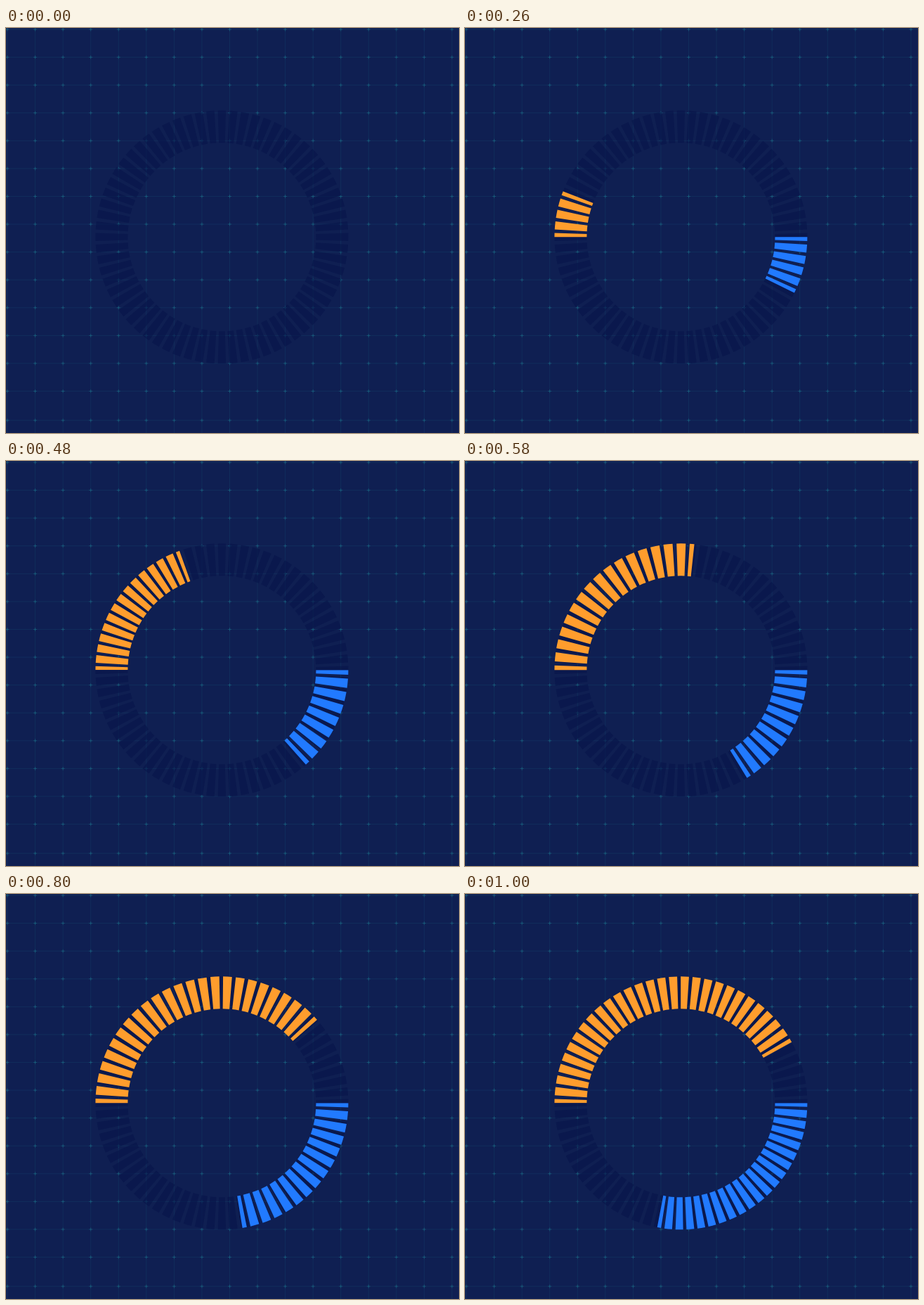
An HTML page without scripts that plays this animation: 645 by 576 pixels, repeating every 1020 ms.

```html
<!DOCTYPE html>
<html lang="en">
<head>
<meta charset="utf-8">
<title>Dashed ring gauge</title>
<style>
  @property --k { syntax: "<number>"; inherits: true; initial-value: 0; }
  @property --u { syntax: "<number>"; inherits: true; initial-value: 0; }
  @property --v { syntax: "<number>"; inherits: true; initial-value: 0; }
  @property --a { syntax: "<number>"; inherits: true; initial-value: 0; }
  @property --parts { syntax: "<number>"; inherits: true; initial-value: 1; }
  /* an integer type rounds its calc() */
  @property --m { syntax: "<integer>"; inherits: true; initial-value: 1; }

  html, body { margin: 0; width: 100%; height: 100%; overflow: hidden; background: #0f1f52; }
  svg { display: block; width: 645px; height: 576px; animation: tick 1020ms steps(51) infinite; }
  @keyframes tick { from { --k: 0; } to { --k: 51; } }

  .line { stroke: rgb(38 150 165 / .12); }
  .cross { stroke: rgb(38 150 165 / .36); }
  .cols { stroke-dasharray: 1 38.56; stroke-dashoffset: -1.5; }
  .bars { stroke-dasharray: 5 34.56; stroke-dashoffset: .5; }

  circle { fill: none; stroke-width: 46; }
  .track {
    stroke: #08154a;
    stroke-opacity: .6;
    stroke-dasharray: 3.706 1.588;
    stroke-dashoffset: 1.853;
  }

  /* --a is the sweep in degrees */
  .blue { stroke: #217aff; --a: calc(var(--k) * 2.016); }

  /* ease-in-out curve, solved around its midpoint with two Newton steps */
  .gold {
    stroke: #ff9d2d;
    --w: (var(--k) / 50 - .5);
    --u: calc((var(--w) + 1.04 * var(--w) * var(--w) * var(--w)) / (.87 + 1.56 * var(--w) * var(--w)));
    --v: calc((var(--w) + 1.04 * var(--u) * var(--u) * var(--u)) / (.87 + 1.56 * var(--u) * var(--u)));
    --a: max(0, 151.2 * (.5 + 1.5 * var(--v) - 2 * var(--v) * var(--v) * var(--v)));
  }

  /* the arc splits into 1, 2 or 4 parts, each holding a whole number of dashes */
  .dashes {
    --parts: calc(1 + clamp(0, (var(--a) - 45) * 999, 1) + 2 * clamp(0, (var(--a) - 90) * 999, 1));
    --m: max(1, var(--a) / var(--parts) / 5.4);
    --step: (var(--a) / var(--parts) / var(--m) * 1px);
    stroke-dasharray: calc(var(--step) * .7) calc(var(--step) * .3);
    stroke-dashoffset: calc(var(--step) * .35);
  }
  .sweep {
    stroke: #fff;
    stroke-width: 60;
    stroke-dasharray: calc(var(--a) * 1px) 400px;
  }
</style>
</head>
<body>
<svg viewBox="0 0 645 576">
  <defs>
    <path id="rows" fill="none" d="M0 2h645m-645 39.58h645m-645 39.58h645m-645 39.58h645m-645 39.58h645m-645 39.58h645m-645 39.58h645m-645 39.58h645m-645 39.58h645m-645 39.58h645m-645 39.58h645m-645 39.58h645m-645 39.58h645m-645 39.58h645M0 558h645"/>
  </defs>

  <path class="line cols" d="M0 288h645" stroke-width="576"/>
  <use href="#rows" class="line"/>
  <use href="#rows" class="cross cols" stroke-width="5"/>
  <use href="#rows" class="cross bars"/>

  <g transform="translate(307.4 297.3)">
    <circle class="track" r="157" pathLength="360"/>
    <g class="blue">
      <mask id="blueArc" maskUnits="userSpaceOnUse" x="-200" y="-200" width="400" height="400">
        <circle class="sweep" r="157" pathLength="360"/>
      </mask>
      <g mask="url(#blueArc)"><circle class="dashes" r="157" pathLength="360"/></g>
    </g>
    <g class="gold" transform="rotate(180)">
      <mask id="goldArc" maskUnits="userSpaceOnUse" x="-200" y="-200" width="400" height="400">
        <circle class="sweep" r="157" pathLength="360"/>
      </mask>
      <g mask="url(#goldArc)"><circle class="dashes" r="157" pathLength="360"/></g>
    </g>
  </g>
</svg>
</body>
</html>
```
